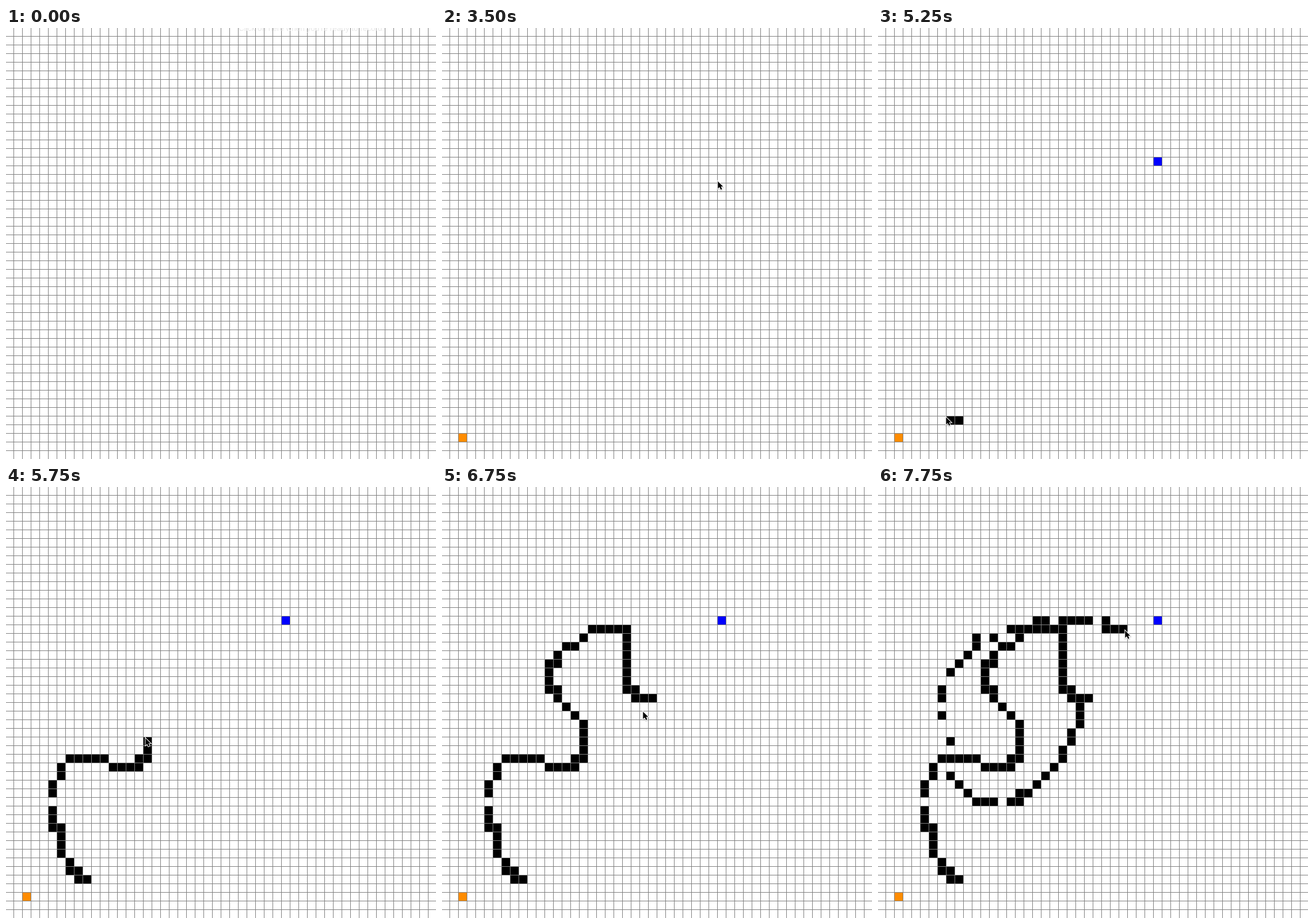
These frames come from a looping animation (747 px wide and 749 px high, 8 s). An HTML page with a canvas:

```html
<!DOCTYPE html>
<html lang="en">
<head>
<meta charset="utf-8">
<style>
  html, body { margin: 0; width: 100%; height: 100%; overflow: hidden; background: #fff; }
  canvas { display: block; }
</style>
</head>
<body>
<canvas width="747" height="749"></canvas>
<script>
const ctx = document.querySelector('canvas').getContext('2d');
const W = 747, H = 749, CELL = 15, STEP = 250, LOOP = 8000;

// Pointer tip at each step, starting with step 3
const FIRST_MOVE = 3;
const pointer = `494,4 400,200 180,520 39,723 40,719 37,717 37,717
  37,717 60,690 220,520 430,320 479,266
  484,240 484,240 470,300 320,520 168,699
  141,680 118,676 95,488 242,436 185,338
  258,246 320,290 349,390 244,540 118,492
  172,262 429,249`.trim().split(/\s+/).map(toPoint);

const ORANGE_STEP = 10, BLUE_STEP = 16, FIRST_WALL = 20;

// Wall strokes added per step, as column,row corners; "/" lifts the brush
const walls = [
  '8,44',
  '7,44',
  '7,43 6,43 6,42 5,41 5,38 4,38 4,36 / 4,34 4,33 / 5,32 5,31',
  '6,30 10,30 11,31 14,31 14,30 15,30 15,28',
  '15,27 15,26 12,23 12,22 11,22 11,21',
  '11,20 11,19 12,19 12,18 13,17 14,17 16,15',
  '16,15 20,15 20,18',
  '20,19 20,22 21,22 21,23 23,23',
  '22,24 22,26 21,27 21,28 20,29 20,30 16,34 15,34 15,35',
  '14,35 / 12,35 10,35 7,32',
  '7,28 / 6,25 / 6,23 6,22 / 7,20 10,17 10,16',
  '12,16 / 14,15 15,15 / 17,14 18,14 / 20,14 23,14 / 25,14 25,15 27,15'
].map(line => line.split(' / ').map(stroke => stroke.split(' ').map(toPoint)));

const arrow = new Path2D('M0 0V12.5L2.9 9.9L5 14.4L7.2 13.4L5.2 9H9Z');

function toPoint(pair) {
  return pair.split(',').map(Number);
}

function drawGrid() {
  ctx.fillStyle = '#fff';
  ctx.fillRect(0, 0, W, H);
  ctx.fillStyle = '#808080';
  for (let x = 13; x < W; x += CELL) ctx.fillRect(x, 0, 1, H);
  for (let y = 14; y < H; y += CELL) ctx.fillRect(0, y, W, 1);
}

function fillCell(col, row, color) {
  ctx.fillStyle = color;
  ctx.fillRect(14 + col * CELL, 15 + row * CELL, 14, 14);
}

function drawStroke(points) {
  let [col, row] = points[0];
  fillCell(col, row, '#000');
  for (const [endCol, endRow] of points.slice(1)) {
    while (col !== endCol || row !== endRow) {
      col += Math.sign(endCol - col);
      row += Math.sign(endRow - row);
      fillCell(col, row, '#000');
    }
  }
}

function drawPointer([x, y]) {
  ctx.save();
  ctx.translate(x + 0.3, y + 0.5);
  ctx.strokeStyle = '#fff';
  ctx.lineWidth = 2;
  ctx.shadowColor = 'rgba(0,0,0,.3)';
  ctx.shadowBlur = 2;
  ctx.shadowOffsetY = 1;
  ctx.stroke(arrow);
  ctx.shadowColor = 'transparent';
  ctx.fillStyle = '#000';
  ctx.fill(arrow);
  ctx.restore();
}

function drawHint() {
  ctx.font = '13.5px "Liberation Sans", sans-serif';
  ctx.fillStyle = '#e6e6e6';
  ctx.fillText("Click on here when you're ready to record.", 404, 5);
}

function draw(now) {
  const step = Math.floor(now % LOOP / STEP);
  drawGrid();
  if (step < FIRST_MOVE) drawHint();
  if (step >= ORANGE_STEP) fillCell(1, 46, '#ff8c00');
  if (step >= BLUE_STEP) fillCell(31, 14, '#00f');
  walls.slice(0, Math.max(0, step - FIRST_WALL + 1)).flat().forEach(drawStroke);
  if (step >= FIRST_MOVE) drawPointer(pointer[step - FIRST_MOVE]);
  requestAnimationFrame(draw);
}
requestAnimationFrame(draw);
</script>
</body>
</html>
```
